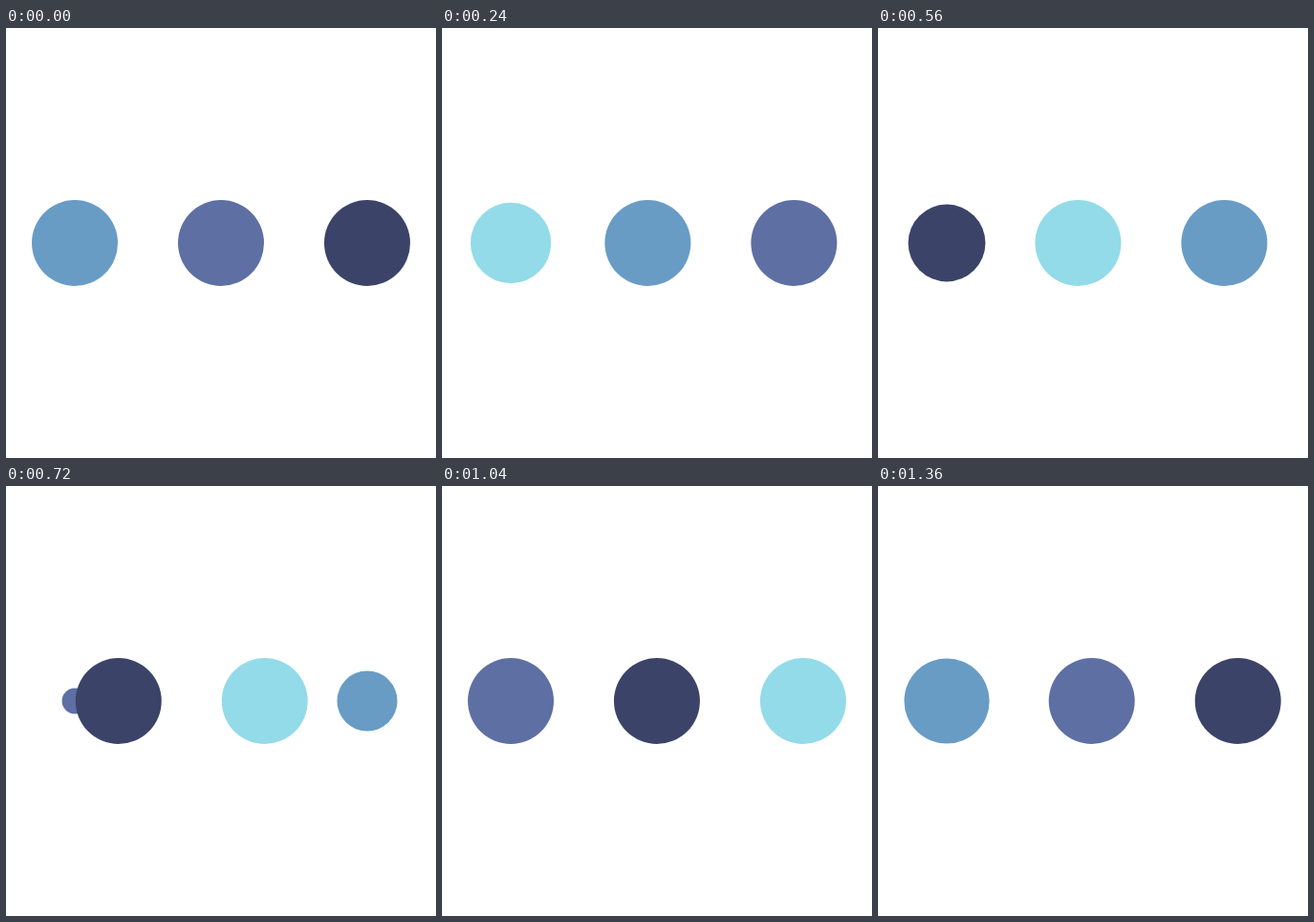
Animation, 450 px wide and 450 px high, one loop 1400 ms. Source, as an HTML page:

```html
<!DOCTYPE html>
<html lang="en">
<head>
<meta charset="utf-8">
<title>Loading dots</title>
<style>
  html, body { margin: 0; width: 100%; height: 100%; overflow: hidden; background: #fff; }
  svg { display: block; width: 450px; height: 450px; }
</style>
</head>
<body>
<svg id="stage" viewBox="0 0 450 450"></svg>
<script>
const COLORS = ['#93dbe9', '#689cc5', '#5e6fa3', '#3b4368'];
const LEFT = 72, MID = 225, RIGHT = 378, RADIUS = 45;
const PHASES = 4;
const EASE = 'cubic-bezier(0, 0.5, 0.5, 1)';
// The loop advances in 40 ms ticks; the 1 ms lead keeps ticks clear of rounding.
const TIMING = { duration: 1400, iterations: Infinity, easing: 'steps(35)', delay: -1 };

const stage = document.getElementById('stage');

// What a dot does in each quarter of its life: [from, to] as [x, radius].
const LIFE = [
  [[LEFT, 0], [LEFT, RADIUS]],
  [[LEFT, RADIUS], [MID, RADIUS]],
  [[MID, RADIUS], [RIGHT, RADIUS]],
  [[LEFT, 0], [LEFT, 0]]
];

function addDot(segmentAt, fillAt) {
  const dot = document.createElementNS('http://www.w3.org/2000/svg', 'circle');
  dot.setAttribute('cy', MID);
  stage.append(dot);

  const frames = [];
  for (let phase = 0; phase < PHASES; phase++) {
    segmentAt(phase).forEach(([x, r], end) => frames.push({
      offset: (phase + end) / PHASES,
      cx: x + 'px',
      r: r + 'px',
      fill: fillAt(phase),
      easing: end ? 'linear' : EASE
    }));
  }
  dot.animate(frames, TIMING);
}

// The vanishing dot lies below the others and takes each colour in turn.
addDot(() => [[RIGHT, RADIUS], [RIGHT, 0]], phase => COLORS[PHASES - 1 - phase]);

COLORS.forEach((color, i) => {
  addDot(phase => LIFE[(phase + i) % PHASES], () => color);
});
</script>
</body>
</html>
```
